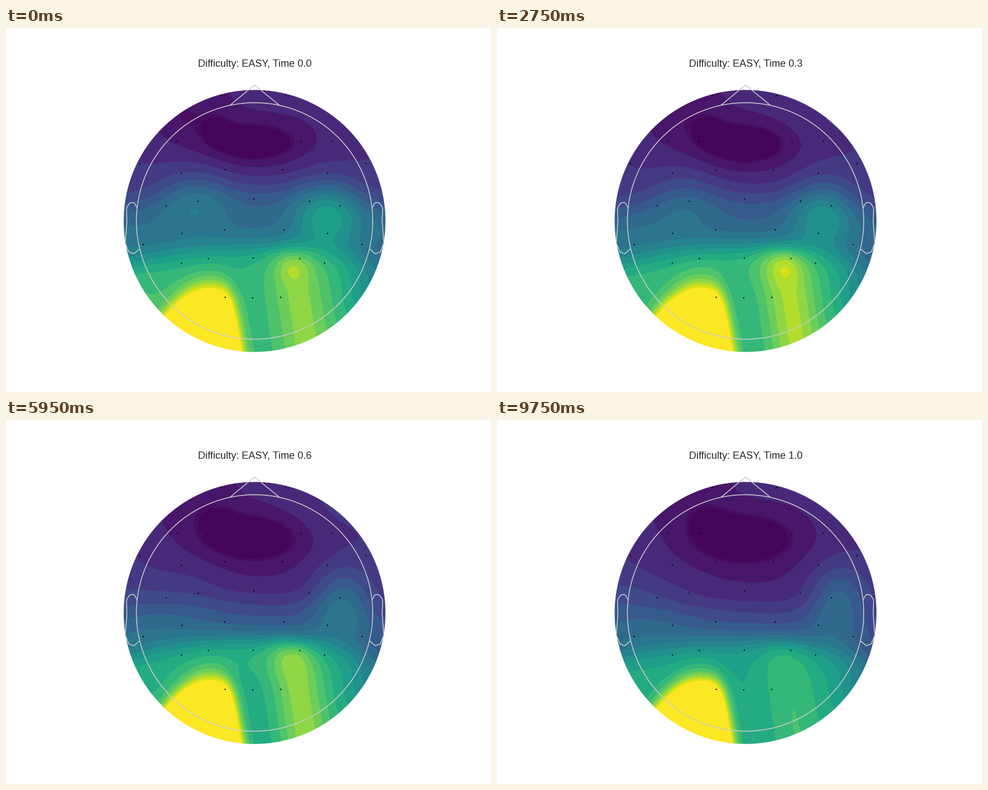
Recreate the animation shown at these times as a matplotlib script. Size 864 px wide and 648 px high, loop 10 s.

```python
import numpy as np
import matplotlib.pyplot as plt
from matplotlib.animation import FuncAnimation
from matplotlib.patches import Circle

W, H, FRAMES, STEP = 864, 648, 200, 50
CX, CY, HEAD, SKIRT = 442.8, 343.5, 210.5, 233.2

# Sensor rows: left x, right x, y
PAIRS = [(383, 498, 120), (305, 581, 201), (359, 525, 202), (237, 641, 241),
         (312, 572, 257.5), (390, 492, 252), (342, 540, 308), (285, 595, 316),
         (389, 495, 359), (313, 572, 365), (244, 634, 385), (312, 567, 417.5),
         (360, 523, 410), (390, 489, 479)]
MIDLINE = [(441, 304), (440, 409), (439, 480)]

# Right ear outline in head diameters
EAR_X = np.array([.497, .51, .518, .5299, .5419, .54, .547, .532, .51, .489])
EAR_Y = np.array([.0555, .0775, .0783, .0746, .0555,
                  -.0055, -.0932, -.1313, -.1384, -.1199])

# Even bands, plus one thin ring around the lowest plateau
LEVELS = np.concatenate(([-9, .03, .042], .092 + .0547 * np.arange(17), [9]))
SHADES = np.concatenate(([.015, .035], .06 + .055 * np.arange(18)))
COLORS = plt.get_cmap("viridis")(np.minimum(SHADES, .995))

X, Y = np.meshgrid(np.arange(208, 682, 4), np.arange(108, 584, 4))
DX = (X - CX) / 230


def sig(v):
    return 1 / (1 + np.exp(-v))


def bump(x, y, sx, sy):
    return np.exp(-((X - x) / sx) ** 2 / 2 - ((Y - y) / sy) ** 2 / 2)


def field(u):
    """Scalp activity at progress u in 0..1."""
    v = min(u / .85, 1)
    w = v * v * (3 - 2 * v)
    swell = np.sin(np.pi * u)

    def mix(a, b):
        return a + (b - a) * w

    # Two steps from front to back, sagging towards the sides
    y = Y - 35 * DX ** 2
    z = (mix(.093, .086) + .06 * DX ** 2
         + mix(.24, .14) * sig((y - mix(285, 330)) / mix(18, 15))
         + mix(.325, .35) * sig((y - mix(390, 392)) / 15))

    # Frontal minimum with its left lobe, and the brow
    z -= .14 * bump(440, mix(205, 212), mix(58, 64), mix(25, 30))
    z -= .05 * bump(378, 178, mix(20, 27), mix(20, 27))
    z -= mix(.07, .035) * bump(310, 152, 45, 38)
    z += .02 * bump(480, 115, 45, 25)
    z += .045 * swell * bump(575, 150, 60, 55)

    # Central ridges and the dim right rim
    z += mix(.13, 0) * bump(335, 300, 45, 40)
    z += mix(0, .11) * bump(240, 345, 80, 45)
    z += mix(.24, .2) * bump(mix(572, 608), mix(330, 322), mix(42, 37), 44)
    z -= mix(.25, .2) * bump(668, 470, 40, 50)
    z += .07 * swell * bump(400, 415, 90, 30)

    # Right posterior column with a small peak on top
    axis = 515 + .15 * (Y - 440)
    column = np.exp(-((X - axis) / 34) ** 2 / 2) * sig((Y - 395) / 8)
    z += (.16 - .06 * u + .11 * swell) * column
    z += mix(.07, .01) * bump(511, 428, 18, 18)

    # Left posterior maximum: steep right side, rounded top
    top = 468 + .0078 * np.maximum(365 - X, 0) ** 2
    side = 400 + .18 * (Y - 480)
    z += mix(.75, .9) * sig((Y - top) / 14) * sig((side - X) / 8)
    return z


fig = plt.figure(figsize=(W / 72, H / 72), dpi=72, facecolor="white")
ax = fig.add_axes([0, 0, 1, 1])
ax.axis("off")

disc = Circle((CX, CY), SKIRT, transform=ax.transData)
title = ax.text(CX, 69, "", ha="center", va="baseline", fontsize=18,
                color="#262626", family="Liberation Sans")

line = dict(color="#cccccc", lw=1.5, zorder=3)
a = np.linspace(0, 2 * np.pi, 181)
ax.plot(CX + HEAD * np.cos(a), CY + HEAD * np.sin(a), **line)
ax.plot([399, CX, 487], [137.5, CY - 1.15 * HEAD, 137.5], **line)
for s in (-1, 1):
    ax.plot(CX + s * 2 * HEAD * EAR_X, CY - 2 * HEAD * EAR_Y, **line)

dots = MIDLINE + [(x, y) for *xs, y in PAIRS for x in xs]
ax.plot(*zip(*dots), "o", color="black", ms=2.4, mew=0, zorder=4)

layers = []


def draw(i):
    # The data advance every second tick and rest at both ends
    u = 0 if i < 5 else min((i - 1) // 2 * 2 + 1, 195) / FRAMES
    while layers:
        layers.pop().remove()
    filled = ax.contourf(X, Y, field(u), levels=LEVELS, colors=COLORS, zorder=1)
    filled.set_clip_path(disc)
    layers.append(filled)
    ax.set(xlim=(0, W), ylim=(H, 0))
    title.set_text(f"Difficulty: EASY, Time {u:.1f}")
    return [filled, title]


anim = FuncAnimation(fig, draw, frames=FRAMES, interval=STEP, repeat=True,
                     repeat_delay=0, blit=False)
plt.show()
```
